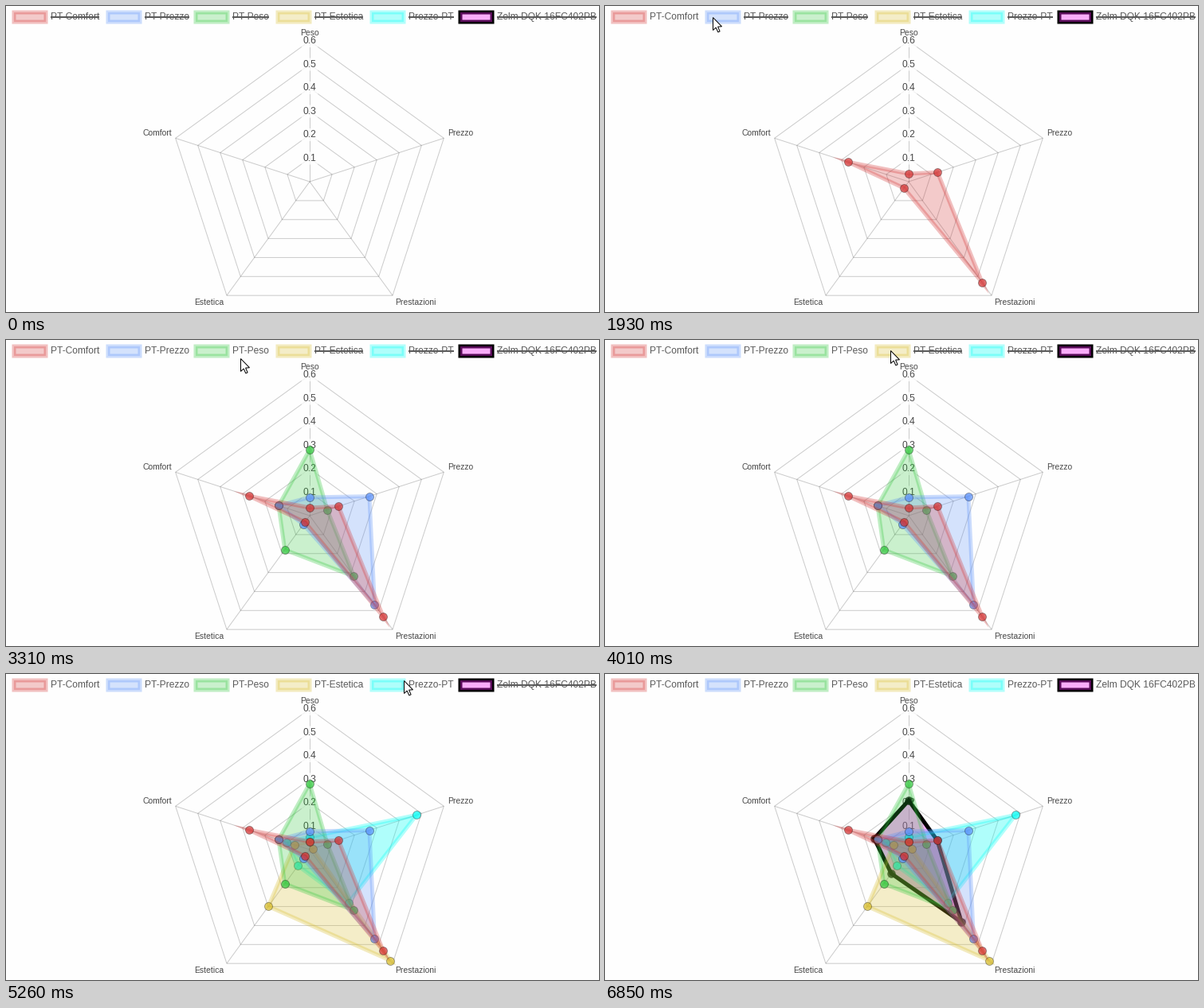
A matplotlib script that plays this animation: 744x385 px, repeating every 8100 ms.

```python
import numpy as np
import matplotlib.pyplot as plt
from matplotlib.animation import FuncAnimation
from matplotlib.collections import LineCollection
from matplotlib.patches import PathPatch, Polygon, Rectangle
from matplotlib.path import Path

W, H, DPI = 744, 385, 100
LOOP, STEP = 8100, 20
PT = 72 / DPI                      # points per pixel
CENTER = np.array([381, 221])
SCALE = 177 / 0.6                  # pixels per data unit
LINE = 5
LEGEND_INK, SCALE_INK = "#5a5a5a", "#484848"

plt.rcParams["font.family"] = "Liberation Sans"

# name, legend x, time shown, colour, fill alpha, weights (Peso, Prezzo,
# Estetica, Comfort); Prestazioni takes what is left of 1
SERIES = [
    ("PT-Comfort", 10, 1230, (211, 47, 47), .25, (.034, .129, .034, .271)),
    ("PT-Prezzo", 128, 2240, (88, 143, 250), .25, (.078, .267, .046, .139)),
    ("PT-Peso", 238, 3310, (47, 199, 59), .25, (.282, .079, .180, .139)),
    ("PT-Estetica", 341, 4300, (217, 190, 42), .25, (.034, .014, .299, .068)),
    ("Prezzo-PT", 459, 5260, (0, 255, 245), .31, (.054, .478, .085, .103)),
    ("Zelm DQK 16FC402PB", 570, 6220, (245, 30, 245), .36, (.210, .128, .126, .154)),
]


def linear(u):
    return u


def speed_up(u):
    return u ** 2


def slow_down(u):
    return 1 - (1 - u) ** 2


# The pointer moves in ticks from one legend box to the next:
# start time, ticks, end x, end y, bow of the path, easing
TICK = 130
POINTER_START, POINTER_END = (7, 14), 6850
MOVES = [
    (590, 3, 17, 16, 0, linear),
    (1230, 5, 135, 14, -6, linear),
    (2230, 6, 244, 12, 2, slow_down),
    (3180, 4, 358, 13, 11, slow_down),
    (4170, 4, 465, 12, -6, slow_down),
    (5120, 6, 576, 11, -4, slow_down),
    (6210, 4, 714, 11, 3, speed_up),
]
ARROW = np.array([(0, 0), (0, 16), (3.7, 12.6), (6.3, 18.4), (8.6, 17.4),
                  (6.1, 11.6), (11, 11.3)]) + 0.5

ANGLES = np.arange(5) * 2 * np.pi / 5
SPOKES = np.column_stack([np.sin(ANGLES), -np.cos(ANGLES)])

fig = plt.figure(figsize=(W / DPI, H / DPI), dpi=DPI, facecolor="#fefefe")
ax = fig.add_axes([0, 0, 1, 1])
ax.set_xlim(0, W)
ax.set_ylim(H, 0)
ax.axis("off")


def radial(values):
    return CENTER + SPOKES * (np.asarray(values) * SCALE).reshape(-1, 1)


def label(x, y, text, size, color, ha="left"):
    return ax.text(x, y, text, fontsize=size * PT, color=color, ha=ha,
                   va="baseline", zorder=3)


def outline(pts, width):
    """Closed stroke with full mitres, as a ring-shaped path."""
    edge = np.roll(pts, -1, axis=0) - pts
    edge /= np.linalg.norm(edge, axis=1, keepdims=True)
    normal = np.column_stack([edge[:, 1], -edge[:, 0]])
    prev = np.roll(normal, 1, axis=0)
    mitre = (normal + prev) / (1 + (normal * prev).sum(axis=1, keepdims=True))
    outer = pts + mitre * width / 2
    inner = (pts - mitre * width / 2)[::-1]
    rings = [np.vstack([ring, ring[:1]]) for ring in (outer, inner)]
    codes = [Path.MOVETO] + [Path.LINETO] * (len(pts) - 1) + [Path.CLOSEPOLY]
    return Path(np.vstack(rings), codes * 2)


def draw_scale():
    levels = np.arange(1, 7) / 10
    rings = [radial(np.full(6, v)[:5])[[0, 1, 2, 3, 4, 0]] for v in levels]
    spokes = [np.array([CENTER, p]) for p in rings[-1][:5]]
    ax.add_collection(LineCollection(rings + spokes, colors=[(0, 0, 0, .2)],
                                     linewidths=PT, zorder=1), autolim=False)
    for v in levels:
        x, y = CENTER[0], CENTER[1] - v * SCALE
        ax.add_patch(Rectangle((x - 10.3, y - 8), 20.6, 16, lw=0, zorder=2,
                               fc=(1, 1, 1, .75), snap=False))
        label(x, y + 3.4, f"{v:.1f}", 12, SCALE_INK, "center")
    for x, y, text, ha in [(381, 37.3, "Peso", "center"),
                           (554, 163, "Prezzo", "left"),
                           (488, 376.3, "Prestazioni", "left"),
                           (273, 376.3, "Estetica", "right"),
                           (208, 163, "Comfort", "right")]:
        label(x, y, text, 10.4, SCALE_INK, ha)


def draw_series(order, name, x, color, alpha, weights):
    rgb = tuple(c / 255 for c in color)
    fill, line, dot = rgb + (alpha,), rgb + (.3,), rgb + (.7,)
    if order == len(SERIES) - 1:   # the product itself is outlined in black
        line, dot = (0, 0, 0, 1), (0, 0, 0, .8)

    ax.add_patch(Rectangle((x, 8), 40, 12, fc="none", ec=line, lw=LINE * PT,
                           joinstyle="miter", snap=False, zorder=3))
    ax.add_patch(Rectangle((x, 8), 40, 12, fc=fill, lw=0, snap=False, zorder=4))
    text = label(x + 46, 17, name, 12, LEGEND_INK)
    width = text.get_window_extent().width
    strike, = ax.plot([x + 46, x + 46 + width], [14, 14], color=LEGEND_INK,
                      lw=2 * PT, solid_capstyle="butt", zorder=4)

    pts = radial(np.insert(weights, 2, 1 - sum(weights)))
    z = 20 - order                 # the first series lies on top
    area = ax.add_patch(Polygon(pts, fc=fill, lw=0, zorder=z))
    border = ax.add_patch(PathPatch(outline(pts, LINE), fc=line, lw=0,
                                    zorder=z + .1))
    dots, = ax.plot(pts[:, 0], pts[:, 1], "o", ms=10 * PT, mfc=dot,
                    mec=(0, 0, 0, .32), mew=PT, zorder=z + .2)
    return strike, (area, border, dots)


def pointer(t):
    x, y = POINTER_START
    for start, ticks, x1, y1, bow, ease in MOVES:
        if t < start:
            break
        e = ease(min((t - start) // TICK, ticks) / ticks)
        x += (x1 - x) * e
        y += (y1 - y) * e + 4 * bow * e * (1 - e)
    return round(x), round(y)


draw_scale()
layers = []
for i, (name, x, start, color, alpha, weights) in enumerate(SERIES):
    layers.append((start, *draw_series(i, name, x, color, alpha, weights)))
arrow = ax.add_patch(Polygon(ARROW, fc="white", ec="black", lw=PT,
                             joinstyle="miter", zorder=30))


def update(i):
    t = i * STEP + STEP / 2
    for start, strike, shapes in layers:
        shown = t >= start
        strike.set_visible(not shown)
        for shape in shapes:
            shape.set_visible(shown)
    arrow.set_visible(MOVES[0][0] <= t < POINTER_END)
    arrow.set_xy(ARROW + pointer(t))
    return [arrow]


anim = FuncAnimation(fig, update, frames=LOOP // STEP, interval=STEP,
                     repeat=True, repeat_delay=0)
plt.show()
```
